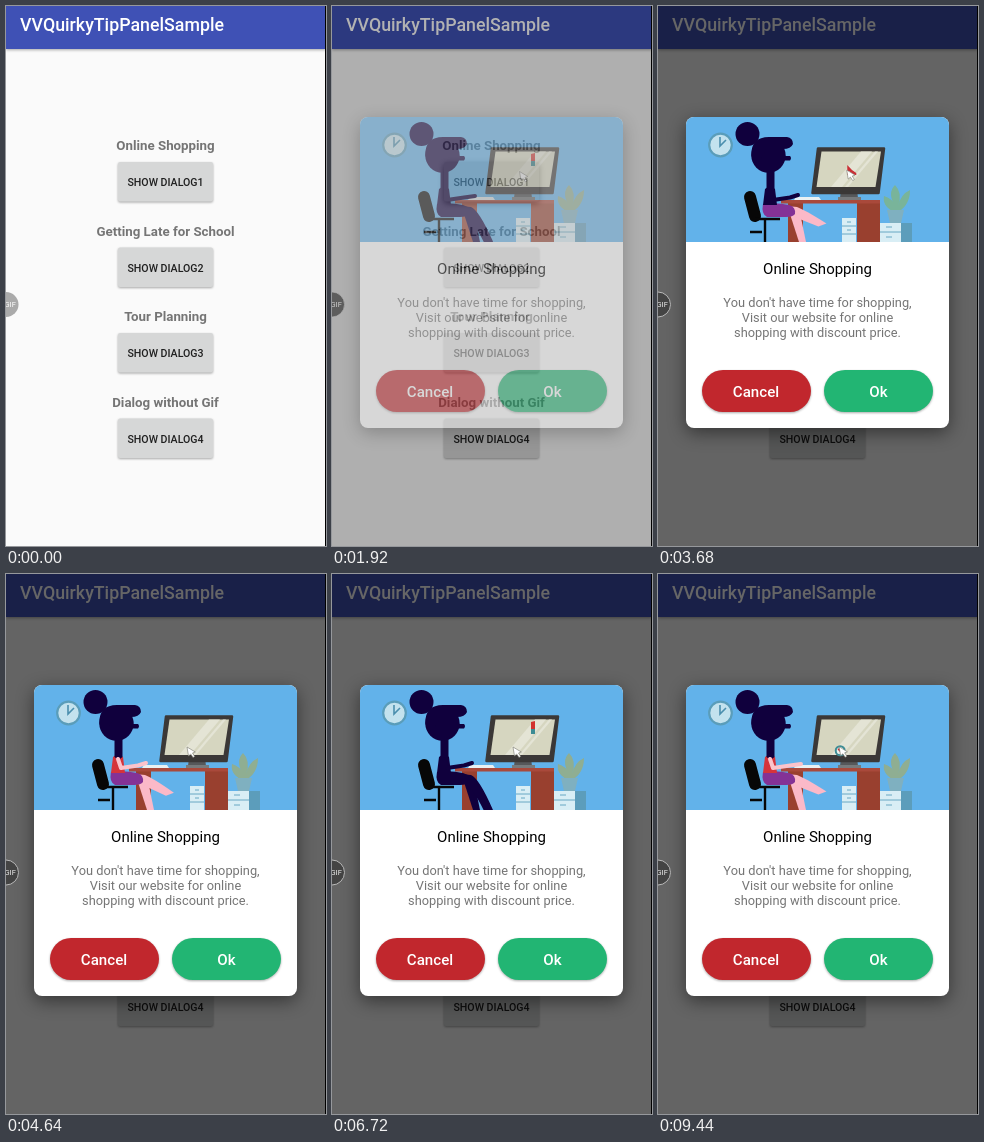
Recreate the animation shown at these times as an HTML page. Size 320 by 540 pixels, loop 9600 ms.

```html
<!DOCTYPE html>
<html lang="en">
<head>
<meta charset="utf-8">
<style>
  html, body { margin: 0; width: 100%; height: 100%; overflow: hidden; }
  svg { display: block; width: 320px; height: 540px; background: #fafafa; font-family: Roboto, sans-serif; }
  .mid { text-anchor: middle; }
  .label { font-weight: 700; font-size: 13.3px; fill: #757575; }
  .button { font-weight: 500; font-size: 10.6px; fill: #1f1f1f; }
  .pill { font-weight: 500; font-size: 15.1px; fill: #fff; }
  .body { font-size: 12.8px; fill: #757575; }
  .raised { filter: drop-shadow(0 1px 1px #0005); }
  .pressed { filter: drop-shadow(0 2px 3px #0007); }
</style>
</head>
<body>
<svg viewBox="0 0 320 540">
  <defs>
    <clipPath id="card"><rect x="28" y="111" width="263" height="311" rx="8"/></clipPath>
    <clipPath id="art"><rect x="28" y="111" width="263" height="125"/></clipPath>
  </defs>

  <rect width="320" height="43" fill="#3f51b5" style="filter:drop-shadow(0 1px 1.5px #0005)"/>
  <text x="14" y="25" font-size="17.8" font-weight="500" fill="#fff">VVQuirkyTipPanelSample</text>
  <g id="menu"></g>
  <g fill="#aaa">
    <circle cy="298.5" r="12.5"/>
    <text x="-1.5" y="301" font-size="7.5" fill="#fff">GIF</text>
  </g>
  <rect id="dim" width="320" height="540"/>
  <g id="ring">
    <circle cy="298.5" r="12.5" fill="#444" stroke="#bbb"/>
    <text x="-1.5" y="301" font-size="7.5" fill="#eee">GIF</text>
  </g>
  <rect x="319" width="1" height="540"/>

  <g id="dialog">
    <rect x="28" y="111" width="263" height="311" rx="8" fill="#fff" style="filter:drop-shadow(0 5px 9px #0007)"/>
    <g clip-path="url(#card)"><g clip-path="url(#art)">
      <rect x="28" y="111" width="263" height="126" fill="#62b2ea"/>

      <circle cx="62.5" cy="139" r="11.3" fill="#c3e2ee" stroke="#5a9dba" stroke-width="2.2"/>
      <path d="M62 131V140L68 134" fill="none" stroke="#4b8fae" stroke-width="1.6"/>

      <!-- plant and cabinets -->
      <path d="M236 206Q224 200 226 190Q234 192 237 200Q229 187 237 179Q245 187 240 200Q243 188 252 184Q252 199 240 206Z" fill="var(--leaf)"/>
      <path d="M229 204H246L243 217H232Z" fill="#7fb0c0"/>
      <path d="M184 212H198V236H184ZM218 217H243V236H218Z" fill="#d9eef5"/>
      <path d="M243 217H254V236H243Z" fill="#5c9dbb"/>
      <path d="M184 220H198M184 228H198M218 226H243M189 216H193M189 224H193M228 221H234M228 231H234" stroke="#69a8c3"/>

      <!-- chair -->
      <path d="M92 191L97 210" stroke="#070707" stroke-width="12" stroke-linecap="round"/>
      <path d="M97 213H122M107 213V236M92 226H104" fill="none" stroke="#070707" stroke-width="2.4"/>

      <!-- desk -->
      <path d="M130 197H145V236H130ZM199 197H222V236H199Z" fill="#99402f"/>
      <path d="M123 194H222V197.500H123Z" fill="#a9493b"/>
      <path d="M138 191H161L163 194H136Z" fill="#e9f1f3"/>

      <!-- monitor -->
      <path d="M183 184H199L200 192H182Z" fill="#56585a"/>
      <path d="M180 191H203V194H180Z" fill="#777a7c"/>
      <path d="M160 142.500H226L220.500 187H154.500Z" fill="#3b3837" stroke="#3b3837" stroke-width="2.500" stroke-linejoin="round"/>
      <path d="M163.500 145.500H223L217.500 181H158.500Z" fill="#d6d6c0"/>
      <path d="M203 145.500H214L184 181H173ZM217 145.500H220L190 181H187Z" fill="#e4e4d5"/>

      <!-- woman -->
      <path d="M131 205L142 207L148 236H141Z" fill="var(--leg)"/>
      <path id="leg" fill="var(--leg)"/>
      <path d="M105 198Q118 196 131 199Q138 201 137 208Q135 211 128 211H109Q103 208 105 198Z" fill="var(--skirt)"/>
      <path d="M107 183Q112 178 117 183L119 199H105Z" fill="var(--shirt)"/>
      <path d="M108.500 163H116.500V183Q112.500 187 108.500 183Z" fill="var(--skin)"/>
      <path id="arm" fill="none" stroke="var(--arm)" stroke-width="4" stroke-linejoin="round" stroke-linecap="round"/>
      <g fill="var(--skin)">
        <circle cx="110.500" cy="149.500" r="17.200"/>
        <path d="M126 150H132Q134 152 132 154.500H126Z"/>
      </g>
      <g fill="var(--hair)">
        <circle cx="89.500" cy="128" r="12"/>
        <path d="M93.300 149Q93 131 111 131H129Q135 132 135 138Q133 143 125 143H108Q106 150 99 157Q94 154 93.300 149Z"/>
      </g>
      <g id="face">
        <circle cx="124" cy="151" r="1.300" fill="#426b9c"/>
        <circle cx="117" cy="158" r="2.500" fill="#f5a3b2"/>
        <path d="M120 161H125" stroke="#d95a6d"/>
      </g>

      <!-- products dragged across the screen -->
      <g class="item"><path d="M-2-7L2-8V0H-2Z" fill="#d2322f"/><path d="M-2 0H2V5H-2Z" fill="#3d8c94"/></g>
      <g class="item"><path d="M-4-5Q0 0 5 3V5H1L-2 1V5H-4Z" fill="#c92f35"/></g>
      <g class="item"><circle r="4.500" fill="#e8f2ee" stroke="#3d8c94" stroke-width="2"/><path d="M-2-2L3 3" stroke="#c92f35" stroke-width="2"/></g>
      <path id="cursor" d="M0 0L1.500 9L3.700 7L6 10.500L7.700 9.400L5.500 6L8.300 5Z" fill="#fff" stroke="#77776e" stroke-width=".6"/>
    </g></g>

    <g class="mid">
      <text x="159.500" y="268" font-size="15">Online Shopping</text>
      <g class="body">
        <text x="159.500" y="301">You don't have time for shopping,</text>
        <text x="159.500" y="316">Visit our website for online</text>
        <text x="159.500" y="331">shopping with discount price.</text>
      </g>
      <g class="pill">
        <rect class="raised" x="44" y="364" width="109" height="42" rx="21" fill="#c1272d"/>
        <rect class="raised" x="166" y="364" width="109" height="42" rx="21" fill="#22b573"/>
        <text x="98" y="390.500">Cancel</text>
        <text x="220.500" y="390.500">Ok</text>
      </g>
    </g>
  </g>
</svg>
<script>
const LOOP = 9600, STEP = 160, PRESS = 1760, SCENE = 4960;
const $ = id => document.getElementById(id);
const svg = document.querySelector('svg');
const items = [...document.querySelectorAll('.item')];
const lerp = (a, b, k) => a + (b - a) * k;
const ease = k => { k = Math.min(1, Math.max(0, k)); return k * k * (3 - 2 * k); };
const move = (el, x, y) => el.setAttribute('transform', `translate(${x} ${y})`);

$('menu').innerHTML = ['Online Shopping', 'Getting Late for School', 'Tour Planning', 'Dialog without Gif']
  .map((label, i) => `<g class="mid" transform="translate(159.5 ${i * 85.5})">
    <text class="label" y="144">${label}</text>
    <rect class="raised" x="-47.5" y="156" width="95" height="39.5" rx="2" fill="#d6d7d7"/>
    <text class="button" y="180">SHOW DIALOG${i + 1}</text></g>`).join('');
const firstButton = $('menu').querySelector('rect');

function paint(p) {
  const dark = '#10003d';
  const skirtOn = p >= 1120, shirtOn = p >= 2400, headOn = p >= 3360;
  const colours = {
    leg: skirtOn ? '#fbb9c8' : dark,
    skirt: skirtOn ? '#843296' : dark,
    shirt: shirtOn ? '#d5343b' : dark,
    arm: shirtOn ? '#fbc3cb' : dark,
    skin: headOn ? '#fcc9d2' : dark,
    hair: headOn ? '#fce479' : dark,
    leaf: headOn ? '#6fc38b' : skirtOn && !shirtOn ? '#79b49a' : '#8fae92'
  };
  for (const name in colours) svg.style.setProperty('--' + name, colours[name]);
  $('face').style.display = headOn ? '' : 'none';
}

function scene(p) {
  paint(p);
  const swing = Math.sin(Math.PI * p / 4640) ** 2;
  const x = lerp(161, 169, swing), y = lerp(236, 216, swing);
  $('leg').setAttribute('d', `M129 200L139 201Q147 204 ${x} ${y}L${x - 8} ${y + 3}Q141 213 130 208Z`);
  const tap = p / STEP % 2;
  $('arm').setAttribute('d', `M112 185L115 194L132 191.500L${140 + tap * 3} ${189 + tap}`);

  // Each product appears, is picked up, then dropped at the cursor's resting place.
  let reach = 0;
  [0, 1460, 2100].forEach((start, i) => {
    const age = p - start, drag = ease((age - 320) / 320);
    const shown = age >= 0 && age < 640;
    items[i].style.display = shown ? '' : 'none';
    move(items[i], lerp(201, 182, drag), lerp(155, 177, drag));
    if (shown) reach = ease(age / 320) - drag;
  });
  move($('cursor'), lerp(181, 194, reach), lerp(173, 158, reach));
}

function draw(now) {
  const t = Math.floor(now % LOOP / STEP) * STEP;
  const open = Math.min(1, Math.max(0, (t - PRESS) / 320));
  firstButton.setAttribute('class', t >= PRESS ? 'pressed' : 'raised');
  $('dim').setAttribute('opacity', open * 0.6);
  $('ring').setAttribute('opacity', open);
  $('dialog').setAttribute('opacity', open);
  scene((t - PRESS + SCENE) % SCENE);
  requestAnimationFrame(draw);
}
requestAnimationFrame(draw);
</script>
</body>
</html>
```
